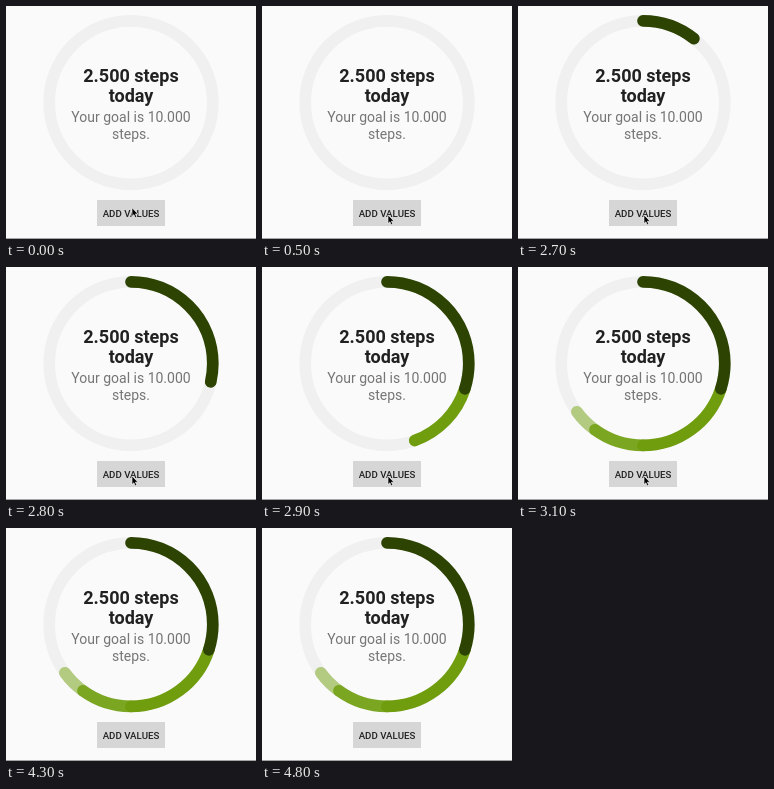
Write an HTML page that moves like this. It is 250 by 233 pixels and loops after 4.9 s.

```html
<!DOCTYPE html>
<html lang="en">
<head>
<meta charset="utf-8">
<title>Step goal</title>
<style>
html, body { margin: 0; width: 100%; height: 100%; overflow: hidden; background: #fafafa; }
svg { display: block; width: 100vw; height: 100vh; }
text { font-family: Roboto, sans-serif; text-anchor: middle; }
.title { font-size: 18px; font-weight: 700; fill: #212121; }
.goal { font-size: 14px; fill: #757575; }
.label { font-size: 9.7px; font-weight: 500; fill: #212121; }
.ring { fill: none; stroke-width: 11.7; stroke-linecap: round; }
#button { fill: #d6d6d6; filter: drop-shadow(0 .6px .6px rgba(0, 0, 0, .25)); }
#button.pressed { filter: drop-shadow(0 1.6px 1.2px rgba(0, 0, 0, .38)); }
</style>
</head>
<body>
<svg viewBox="0 0 250 233">
  <circle class="ring" cx="125" cy="96.6" r="81.8" stroke="#f0f0f0"/>
  <g id="arcs"></g>
  <text class="title" x="125" y="75.5">2.500 steps</text>
  <text class="title" x="125" y="96.3">today</text>
  <text class="goal" x="125" y="116">Your goal is 10.000</text>
  <text class="goal" x="125" y="132.5">steps.</text>
  <rect id="button" x="91" y="194" width="68" height="26" rx="1.5"/>
  <text class="label" x="125" y="210.5">ADD VALUES</text>
  <path d="M0 232.5H250" stroke="#a6a6a6"/>
  <path id="cursor" d="M0 0V8.6L1.9 6.8 3.2 9.8 4.7 9.1 3.4 6.2H6Z" fill="#000" stroke="#fff" stroke-width=".6"/>
</svg>
<script>
const LOOP = 4900, TICK = 100;
const SWEEP_START = 2645, SWEEP_TIME = 1000;
const PRESS = [2500, 2700], CURSOR_HIDES = 3500;
const cursorStops = [[0, 201.8], [100, 203.6], [200, 206.2], [300, 208], [500, 209]];
const segments = [[30, '#2d4302'], [20, '#6f9d0d'], [10, '#7ba622'], [5, '#b3cb80']];

const byId = id => document.getElementById(id);
const button = byId('button'), cursor = byId('cursor'), group = byId('arcs');

let angle = 0;
const arcs = segments.map(([percent, color]) => {
  const node = document.createElementNS('http://www.w3.org/2000/svg', 'circle');
  const start = angle, sweep = percent * 3.6;
  const attributes = {
    class: 'ring', cx: 125, cy: 96.6, r: 81.8, pathLength: 360,
    stroke: color, transform: `rotate(${start - 90} 125 96.6)`
  };
  for (const name in attributes) node.setAttribute(name, attributes[name]);
  group.prepend(node); // earlier segments overlap later ones
  angle += sweep;
  return { node, start, sweep };
});

function draw(time) {
  const progress = Math.min(1, Math.max(0, (time - SWEEP_START) / SWEEP_TIME));
  const seek = 360 * (1 - (1 - progress) ** 2);
  for (const { node, start, sweep } of arcs) {
    const shown = Math.min(sweep, seek - start);
    node.style.display = shown > 0 ? '' : 'none';
    if (shown > 0) node.setAttribute('stroke-dasharray', `${shown} 360`);
  }
  const y = cursorStops.filter(([at]) => at <= time).pop()[1];
  cursor.setAttribute('transform', `translate(126 ${y})`);
  cursor.style.display = time < CURSOR_HIDES ? '' : 'none';
  button.classList.toggle('pressed', time >= PRESS[0] && time < PRESS[1]);
}

const origin = performance.now();
function frame() {
  const elapsed = (performance.now() - origin) % LOOP;
  draw(Math.floor(elapsed / TICK) * TICK);
  requestAnimationFrame(frame);
}
frame();
</script>
</body>
</html>
```
